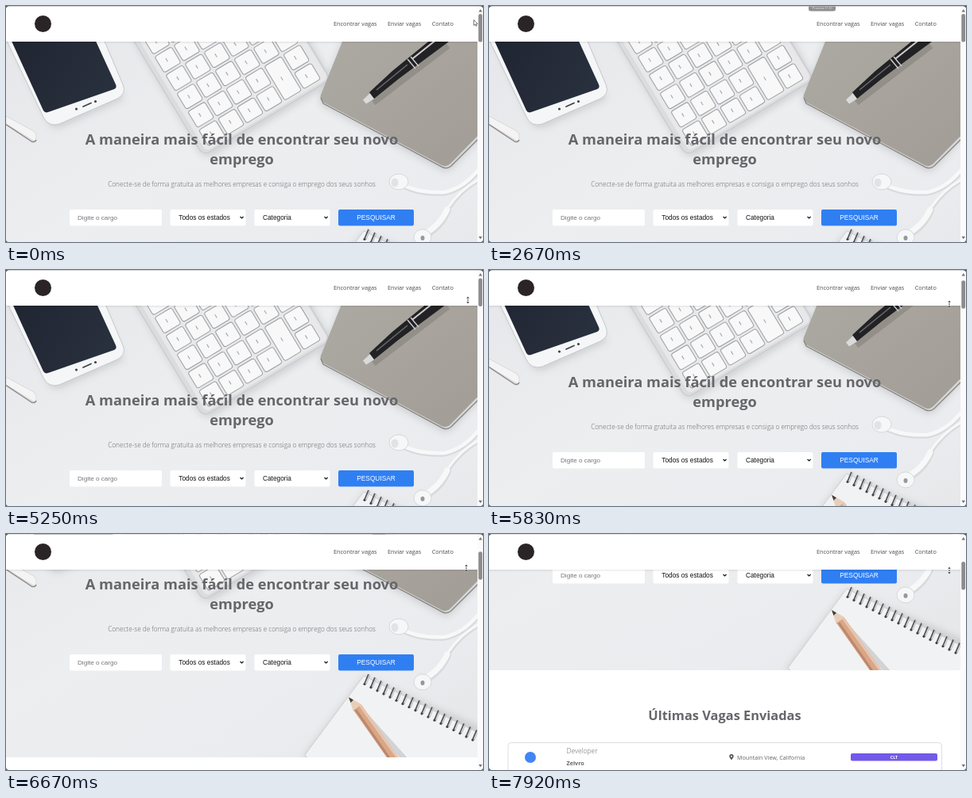
Animation of 600 by 298 pixels, one loop 8000 ms. Source, as an HTML page:

```html
<!DOCTYPE html>
<html lang="pt-BR">
<head>
<meta charset="utf-8">
<title>Vagas</title>
<style>
  html, body { margin: 0; width: 100%; height: 100%; overflow: hidden; background: #555; }
  svg { display: block; width: 600px; height: 298px; }
  text { font-family: "Open Sans", sans-serif; fill: #66666a; white-space: pre; }
  .h { font-weight: 700; text-anchor: middle; }
  .light { font-weight: 300; }
  .nav { font-size: 7.3px; fill: #4c4c50; }
  .field { font: 8.3px "Liberation Sans", Arial, sans-serif; fill: #111; }
</style>
</head>
<body>
<svg viewBox="0 0 600 298">
  <defs>
    <clipPath id="win"><rect y=".4" width="600" height="297.6" rx="4"/></clipPath>
    <clipPath id="hero"><rect y="40" width="593" height="347"/></clipPath>
    <linearGradient id="desk" x1="0" y1="0" x2="1" y2="1">
      <stop offset="0" stop-color="#e4e6e9"/><stop offset=".4" stop-color="#ebedef"/>
      <stop offset=".75" stop-color="#eaebee"/><stop offset="1" stop-color="#e2e4e6"/>
    </linearGradient>
    <linearGradient id="glass" x1="0" y1="0" x2="1" y2=".4">
      <stop offset="0" stop-color="#111723"/><stop offset="1" stop-color="#1b2331"/>
    </linearGradient>
    <linearGradient id="cover" x1="0" y1="0" x2="1" y2="1">
      <stop offset="0" stop-color="#a8a49d"/><stop offset="1" stop-color="#9b9790"/>
    </linearGradient>
    <linearGradient id="shade" x1="0" y1="0" x2="0" y2="1">
      <stop offset="0" stop-color="#000" stop-opacity=".08"/><stop offset="1" stop-color="#000" stop-opacity="0"/>
    </linearGradient>
    <filter id="soft" x="-20%" y="-20%" width="140%" height="140%"><feGaussianBlur stdDeviation="4"/></filter>
  </defs>

  <g clip-path="url(#win)">
    <rect width="600" height="298" fill="#fff"/>
    <g id="page">
      <g clip-path="url(#hero)">
        <rect y="40" width="593" height="347" fill="url(#desk)"/>
        <g filter="url(#soft)" fill="#8c8f94" opacity=".3">
          <path d="M2 40 L52 146 Q56 156 70 153 L148 118 L118 40Z"/>
          <path d="M158 40 L243 184 Q250 193 262 188 L412 96 L380 40Z"/>
          <path d="M424 40 L394 116 L396 126 L550 209 L560 207 L600 164 L600 40Z"/>
          <path d="M450 284 L372 388 L600 388 L600 350Z"/>
        </g>

        <!-- phone -->
        <path d="M-1 40 L47 140 Q53 153 67 149 L140 117 Q152 111 147 99 L122 40Z" fill="#f4f5f6" stroke="#c3c4c7"/>
        <path d="M5 40 L47 132 Q49 135.500 53 134 L136 105 Q140 103 138 99 L111 40Z" fill="url(#glass)"/>
        <path d="M97 127 L107 122.500" stroke="#33363c" stroke-width="1.8" stroke-linecap="round"/>
        <circle cx="88.500" cy="130" r="1.6" fill="#33363c"/><circle cx="112.500" cy="120.500" r="1.6" fill="#33363c"/>

        <path d="M0 139 L35 158 Q41 164 36 171 L0 149Z" fill="#f3f3f4" stroke="#d0d0d2" stroke-width=".8"/>
        <path d="M0 149.500 L33 171.500 Q37 172 38 169" stroke="#8d8680" stroke-width="1.5" fill="none"/>

        <!-- keyboard -->
        <g id="keys" transform="translate(248 189) rotate(-31)">
          <rect y="-220" width="187" height="220" rx="9" fill="#d9dadb" stroke="#c3c4c6"/>
          <rect x="6" y="-220" width="179" height="217" rx="6" fill="#e6e7e9"/>
        </g>

        <!-- notebook and pen -->
        <path d="M425 40 L396 112 Q394 118 400 122 L548 201 Q554 204 559 199 L600 157 L600 40Z" fill="url(#cover)"/>
        <path d="M396 116 L399 123 L550 204 Q555 206 560 202 L600 162" fill="none" stroke="#827e78" stroke-width="1.4"/>
        <path d="M462 122 L556 50" stroke="#5a5652" stroke-width="8" opacity=".3"/>
        <path d="M449 118.500 L458 110 L463.500 117 L453 123.500Z" fill="#d8d8d8"/>
        <path d="M457 109 L486 82 L547 32 L557 45 L494 92 L463 117Z" fill="#141417"/>
        <path d="M466 106 L505 74" stroke="#606166" stroke-width="1.6"/>
        <path d="M505 67 L515 79 M509 64 L519 76" stroke="#c9c9ca" stroke-width="1.500"/>
        <path d="M512 66 L542 42" stroke="#c9c9ca" stroke-width="2.200" stroke-linecap="round"/>

        <!-- earphones -->
        <g fill="none" stroke-linecap="round">
          <g stroke="#d6d8db">
            <path d="M497 227 Q520 239 552 237 Q575 232 593 211" stroke-width="5"/>
            <path d="M527 290 Q548 279 556 258" stroke-width="8"/>
            <path d="M556 258 Q572 234 593 222" stroke-width="4"/>
          </g>
          <g stroke="#f6f7f8">
            <path d="M497 225 Q520 237 552 235 Q575 230 593 208" stroke-width="4.500"/>
            <path d="M526 288 Q546 277 555 257" stroke-width="7"/>
            <path d="M555 256 Q571 232 593 220" stroke-width="3"/>
          </g>
        </g>
        <g fill="#f5f6f7" stroke="#d3d5d8">
          <ellipse cx="494" cy="222" rx="12" ry="10"/><ellipse cx="524" cy="292" rx="11" ry="10"/>
        </g>
        <ellipse cx="489" cy="223" rx="4.500" ry="5.500" fill="#dfe1e4"/>
        <ellipse cx="524" cy="293" rx="2.500" ry="3" fill="#8f9196"/>

        <!-- pad and pencil -->
        <path d="M450 284 L376 384 L382 390 L600 390 L600 359Z" fill="#f0f1f2" stroke="#cbccd0"/>
        <g id="coil"></g>
        <path d="M444 325 L505 393" stroke="#9fa0a4" stroke-width="7" opacity=".4"/>
        <path d="M431 311 L447 320 L437 329Z" fill="#e7cbb4"/>
        <path d="M431 311 L437 314.500 L433.500 318Z" fill="#333"/>
        <path d="M442 324 L494 398" stroke="#d6a181" stroke-width="12"/>
        <path d="M440 327 L489 398" stroke="#b98062" stroke-width="3"/>
        <path d="M445 321 L497 394" stroke="#e8c1a8" stroke-width="3"/>
        <rect y="40" width="593" height="347" fill="#fff" opacity=".06"/>
      </g>

      <text class="h" x="296.500" y="175" font-size="18.25">A maneira mais fácil de encontrar seu novo</text>
      <text class="h" x="296.500" y="200" font-size="18.25">emprego</text>
      <text class="light" x="296.500" y="228" font-size="8.24" text-anchor="middle">Conecte-se de forma gratuita as melhores empresas e consiga o emprego dos seus sonhos</text>

      <g fill="#fff">
        <rect x="80" y="257" width="116" height="20.500" rx="2"/>
        <rect x="206.500" y="257" width="95" height="20.500" rx="2"/>
        <rect x="312.500" y="257" width="95" height="20.500" rx="2"/>
        <rect x="418" y="257" width="95" height="20.500" rx="2" fill="#2f7ff3"/>
      </g>
      <text class="field" x="90" y="270" style="fill:#747478;font-size:8.1px">Digite o cargo</text>
      <text class="field" x="217.300" y="270">Todos os estados</text>
      <text class="field" x="323" y="270">Categoria</text>
      <text class="field" x="465.500" y="270" text-anchor="middle" style="fill:#fff">PESQUISAR</text>
      <path d="M294.600 266 l2 2 2 -2 M400.600 266 l2 2 2 -2" fill="none" stroke="#111" stroke-width="1.200"/>

      <text class="h" x="296.500" y="450" font-size="16.4">Últimas Vagas Enviadas</text>
      <rect x="24" y="478.500" width="545.500" height="60" rx="4" fill="#fff" stroke="#dedee2"/>
      <circle cx="52" cy="497" r="7" fill="#4285f4"/>
      <text class="light" x="97.500" y="492" font-size="8.5">Developer</text>
      <text x="97.500" y="506.700" font-size="7.2" font-weight="700">Zelvro</text>
      <path d="M305 500.500 Q302.300 497 302.300 495.800 A2.700 2.700 0 0 1 307.700 495.800 Q307.700 497 305 500.500Z" fill="#55555a"/>
      <circle cx="305" cy="495.800" r="1" fill="#fff"/>
      <text x="312" y="499.600" font-size="7.2">Mountain View, California</text>
      <rect x="455" y="492" width="109" height="9.500" rx="2" fill="#7259ea"/>
      <text x="509.500" y="498.800" font-size="5.4" font-weight="700" text-anchor="middle" style="fill:#fff">CLT</text>
    </g>

    <!-- fixed header -->
    <rect width="593" height="45" fill="#fff"/>
    <rect y="45" width="593" height="3" fill="url(#shade)"/>
    <circle cx="46.500" cy="22.500" r="10.500" fill="#2a2426"/>
    <text class="nav" x="412" y="25">Encontrar vagas</text>
    <text class="nav" x="480" y="25">Enviar vagas</text>
    <text class="nav" x="535.700" y="25">Contato</text>

    <!-- scrollbar -->
    <rect x="593" width="7" height="298" fill="#fbfbfb"/>
    <path d="M594.500 7.500 L596.800 4 L599 7.500Z M594.500 291 L596.800 294.500 L599 291Z" fill="#777"/>
    <rect id="thumb" x="594.300" y="10" width="4.800" height="35.500" rx="2.200" fill="#8c8c8c"/>

    <g id="pill">
      <path d="M402 0 H436 V4 Q436 6.500 433 6.500 H405 Q402 6.500 402 4Z" fill="#8f8f8f"/>
      <text x="419" y="4" font-size="4.3" text-anchor="middle" style="fill:#e8e8e8">Preview (1:0)</text>
    </g>
    <path id="arrow" d="M0 0 V7 L1.600 5.600 L2.700 8 L3.700 7.500 L2.700 5.200 H4.900Z" fill="#fff" stroke="#444" stroke-width=".7"/>
    <g id="pan" fill="#222" stroke="#fff" stroke-width=".4">
      <path d="M-2 -2 L0 -4.500 L2 -2Z M-2 2 L0 4.500 L2 2Z"/>
      <circle r="1"/>
      <path id="sides" d="M-3 -2.300 L-6 0 L-3 2.300Z M3 -2.300 L6 0 L3 2.300Z"/>
    </g>
  </g>
</svg>
<script>
const LOOP = 8000, FPS = 12;
const $ = id => document.getElementById(id);

function add(parent, tag, attrs) {
  const el = document.createElementNS("http://www.w3.org/2000/svg", tag);
  for (const k in attrs) el.setAttribute(k, attrs[k]);
  parent.appendChild(el);
}

// keyboard keys: six columns, the fifth starting with a double-length key
for (let c = 0; c < 6; c++) {
  let bottom = -7;
  for (let r = 0; r < 8; r++) {
    const x = 12 + c * 28, size = c === 4 && r === 0 ? 50 : 23.5, y = bottom - size;
    add($("keys"), "rect", { x, y, width: 24.5, height: size, rx: 3, fill: "#f7f8f9", stroke: "#96989b", "stroke-width": 1 });
    add($("keys"), "path", { d: `M${x + 11} ${y + size / 2 - 3}v5`, stroke: "#a2a4a7", "stroke-width": 1.2 });
    bottom = y - 3.5;
  }
}

// wire binding
for (let i = 0; i < 19; i++) {
  const x = 453 + i * 8, y = 289 + i * 4.15;
  add($("coil"), "path", { d: `M${x + 3} ${y - 7}L${x - 2} ${y + 5}`, stroke: "#4a4b4f", "stroke-width": 1.8 });
  add($("coil"), "path", { d: `M${x + 5} ${y - 6}L${x} ${y + 6}`, stroke: "#b5b6ba", "stroke-width": 1 });
  add($("coil"), "circle", { cx: x - 2, cy: y + 5.5, r: 1.6, fill: "#36373b" });
}

// rows: time, value(s)
const SCROLL = [[4417, 0], [5250, 4], [5333, 7], [5417, 7], [5500, 11], [5833, 27], [6250, 66],
                [6667, 105], [7167, 150], [7917, 215], [8000, 222]];
const ARROW = [[2833, 478, -8], [2917, 520, 3], [3000, 553, 10], [3083, 572, 15], [3167, 578, 17]];
const PAN = [[4417, 581, 22], [5250, 581, 38], [5833, 579, 43], [7167, 579, 43], [7917, 579, 46]];

function at(rows, t, col = 1) {
  if (t <= rows[0][0]) return rows[0][col];
  for (let i = 1; i < rows.length; i++) {
    const a = rows[i - 1], b = rows[i];
    if (t <= b[0]) return a[col] + (b[col] - a[col]) * (t - a[0]) / (b[0] - a[0]);
  }
  return rows[rows.length - 1][col];
}

const show = (id, on) => $(id).style.display = on ? "" : "none";
const move = (id, x, y) => $(id).setAttribute("transform", `translate(${x} ${y})`);

function draw(now) {
  const frame = Math.floor((now % LOOP) * FPS / 1000 + 0.05);
  const t = frame * 1000 / FPS;
  const y = Math.round(at(SCROLL, t));
  move("page", 0, -y);
  move("thumb", 0, y * 0.116);

  show("pill", t > 2660 && t < 2910);
  show("arrow", t < 830 || (t > 2740 && t < 4245));
  if (t < 745) move("arrow", 588.5, 17.5);
  else if (t < 830) move("arrow", 536, 34);
  else move("arrow", at(ARROW, t), at(ARROW, t, 2));

  show("pan", t > 4245);
  show("sides", t < 4495);
  move("pan", at(PAN, t), at(PAN, t, 2));
}

function tick() {
  draw(performance.now());
  requestAnimationFrame(tick);
}
tick();
</script>
</body>
</html>
```
